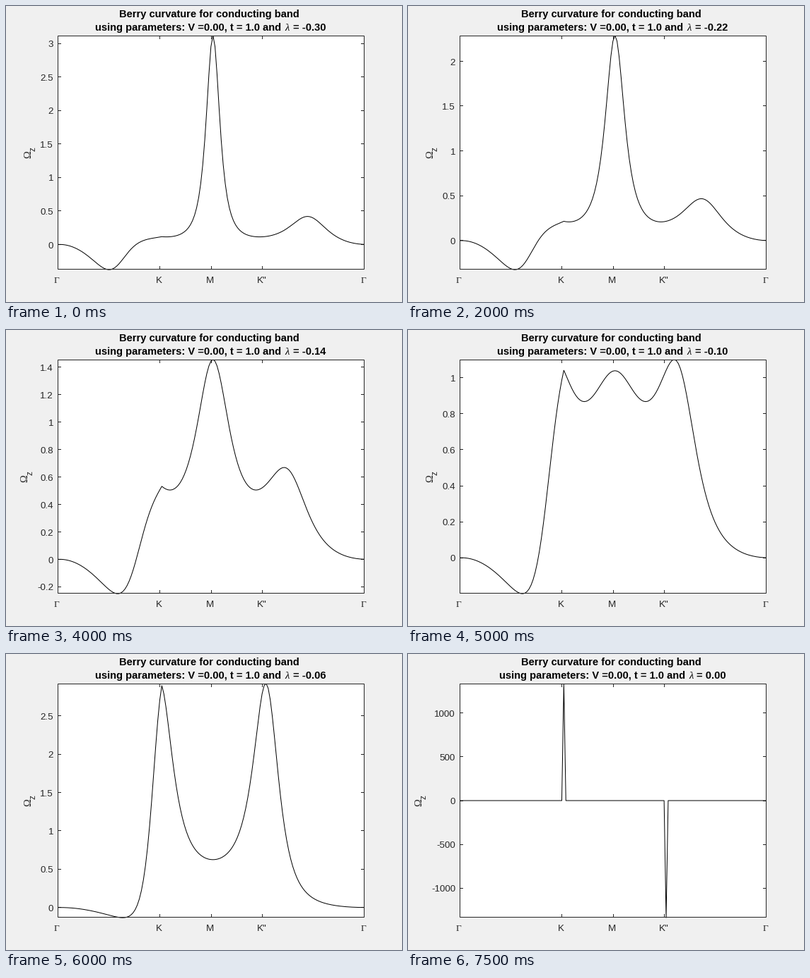
These frames come from a looping animation (560x420 px, 8 s). A matplotlib script:

```python
import math

import matplotlib.pyplot as plt
import numpy as np
from matplotlib.animation import FuncAnimation
from matplotlib.patches import Rectangle

W, H, DPI = 560, 420, 100
# Plot area of the data, and the whole-pixel frame drawn around it.
LEFT, RIGHT, TOP, BOTTOM = 72.8, 506.8, 41.9, 374.1
X0, X1, Y0, Y1 = 73, 506, 42, 373
TICK = 4
FRAMES, INTERVAL = 16, 500
STEPS = 150
PX = 72 / DPI
DARK = (0.15, 0.15, 0.15)
SANS, SERIF = "Liberation Sans", "Liberation Serif"
TICK_SIZE, LABEL_SIZE = 40 / 3, 44 / 3
SPIKE = 1338

fig = plt.figure(figsize=(W / DPI, H / DPI), dpi=DPI, facecolor="#f0f0f0")
ax = fig.add_axes([0, 0, 1, 1])


def k_path():
    """Scaled momenta along Gamma - K - M - K'' - Gamma."""
    i = np.maximum(np.arange(STEPS + 1) - 1, 0)
    x = np.interp(i, [0, 50, 150], [0, 2 * np.pi / 3, 0])
    y = np.interp(i, [0, 50, 150], [0, 0, 2 * np.pi])
    return x, y


def curvature(lam):
    """Berry curvature of a two-band honeycomb model, h = (h1, h2, h3)."""
    if lam == 0:
        omega = np.zeros(STEPS + 1)
        omega[51], omega[101] = SPIKE, -SPIKE
        return omega
    x, y = k_path()
    cx, sx, cy, sy = np.cos(x), np.sin(x), np.cos(y), np.sin(y)
    h = np.array([1 + 2 * cx * cy, 2 * cx * sy,
                  4 * lam * (np.sin(2 * x) - 2 * sx * cy)])
    hx = np.array([-2 * sx * cy, -2 * sx * sy,
                   8 * lam * (np.cos(2 * x) - cx * cy)])
    hy = np.array([-2 * cx * sy, 2 * cx * cy, 8 * lam * sx * sy])
    triple = (h * np.cross(hx, hy, axis=0)).sum(axis=0)
    norm = np.sqrt((h ** 2).sum(axis=0))
    return 3 * math.sqrt(3) / 8 * triple / norm ** 3


def nice_ticks(lo, hi):
    base = 10 ** math.floor(math.log10((hi - lo) / 11))
    step = next(m * base for m in (1, 2, 5, 10) if (hi - lo) / (m * base) <= 11)
    first, last = math.ceil(lo / step), math.floor(hi / step)
    return [n * step for n in range(first, last + 1)]


def label_width(s):
    em = {"-": 0.333, ".": 0.278}
    return TICK_SIZE * sum(em.get(c, 0.556) for c in s)


def put(x, y, s, size=TICK_SIZE, family=SANS, color=DARK, ha="center", **kw):
    return ax.text(x, y, s, fontsize=size * PX, family=family, color=color,
                   ha=ha, va="baseline", **kw)


def stroke(xs, ys, color=DARK, **kw):
    return ax.plot(xs, ys, color=color, lw=PX, **kw)[0]


def draw_title(lam):
    style = dict(size=LABEL_SIZE, color="black")
    put(287.8, 16, "Berry curvature for conducting band", weight="bold", **style)
    parts = [
        put(0, 35, "using parameters: V =0.00, t = 1.0 and",
            ha="left", weight="bold", **style),
        put(0, 35, "λ", ha="left", family=SERIF, style="italic", **style),
        put(0, 35, f"= {lam:.2f}", ha="left", weight="bold", **style),
    ]
    renderer = fig.canvas.get_renderer()
    widths = [p.get_window_extent(renderer).width for p in parts]
    gap = 5.2
    x = 289.3 - (sum(widths) + 2 * gap) / 2
    for part, w in zip(parts, widths):
        part.set_x(x)
        x += w + gap


def draw_axes(lo, hi, to_y):
    for frac, name in ((1 / 3, "K"), (1 / 2, "M"), (2 / 3, 'K"')):
        x = LEFT + frac * (RIGHT - LEFT)
        col = round(x)
        stroke([col, col], [Y1, Y1 - TICK])
        stroke([col, col], [Y0, Y0 + TICK])
        put(x - 0.8, 393, name)
    for x in (LEFT, RIGHT):
        put(x - 1.8, 393, "Γ", family=SERIF)

    widest = 0
    for v in nice_ticks(lo, hi):
        y = to_y(v)
        row = math.floor(y)
        stroke([X0, X0 + TICK], [row, row])
        stroke([X1, X1 - TICK], [row, row])
        s = f"{round(v, 6):g}"
        put(67, round(y + 5.2), s, ha="right")
        widest = max(widest, label_width(s))

    x = round(53.4 - widest)
    turn = dict(ha="left", rotation=90, rotation_mode="anchor")
    put(x, 216, "Ω", size=LABEL_SIZE, family=SERIF, **turn)
    put(x + 7, 206, "z", size=0.8 * LABEL_SIZE, **turn)


def update(i):
    lam = (2 * i - 30) / 100
    omega = curvature(lam)
    lo, hi = omega.min(), omega.max()

    def to_y(v):
        return BOTTOM - (v - lo) / (hi - lo) * (BOTTOM - TOP)

    ax.clear()
    ax.set_axis_off()
    ax.set_xlim(0, W)
    ax.set_ylim(H, 0)
    box = (X0, Y0), X1 - X0, Y1 - Y0
    ax.add_patch(Rectangle(*box, fc="white", ec="none", zorder=0))
    draw_axes(lo, hi, to_y)
    curve = stroke(np.linspace(LEFT, RIGHT, STEPS + 1), to_y(omega),
                   color="black", zorder=3)
    clip = Rectangle((X0, Y0), X1 - X0 + 1, Y1 - Y0 + 2, transform=ax.transData)
    curve.set_clip_path(clip)
    ax.add_patch(Rectangle(*box, fc="none", ec=DARK, lw=PX, zorder=4))
    draw_title(lam)
    return []


anim = FuncAnimation(fig, update, frames=FRAMES, interval=INTERVAL,
                     repeat=True, repeat_delay=0, blit=False)
plt.show()
```
